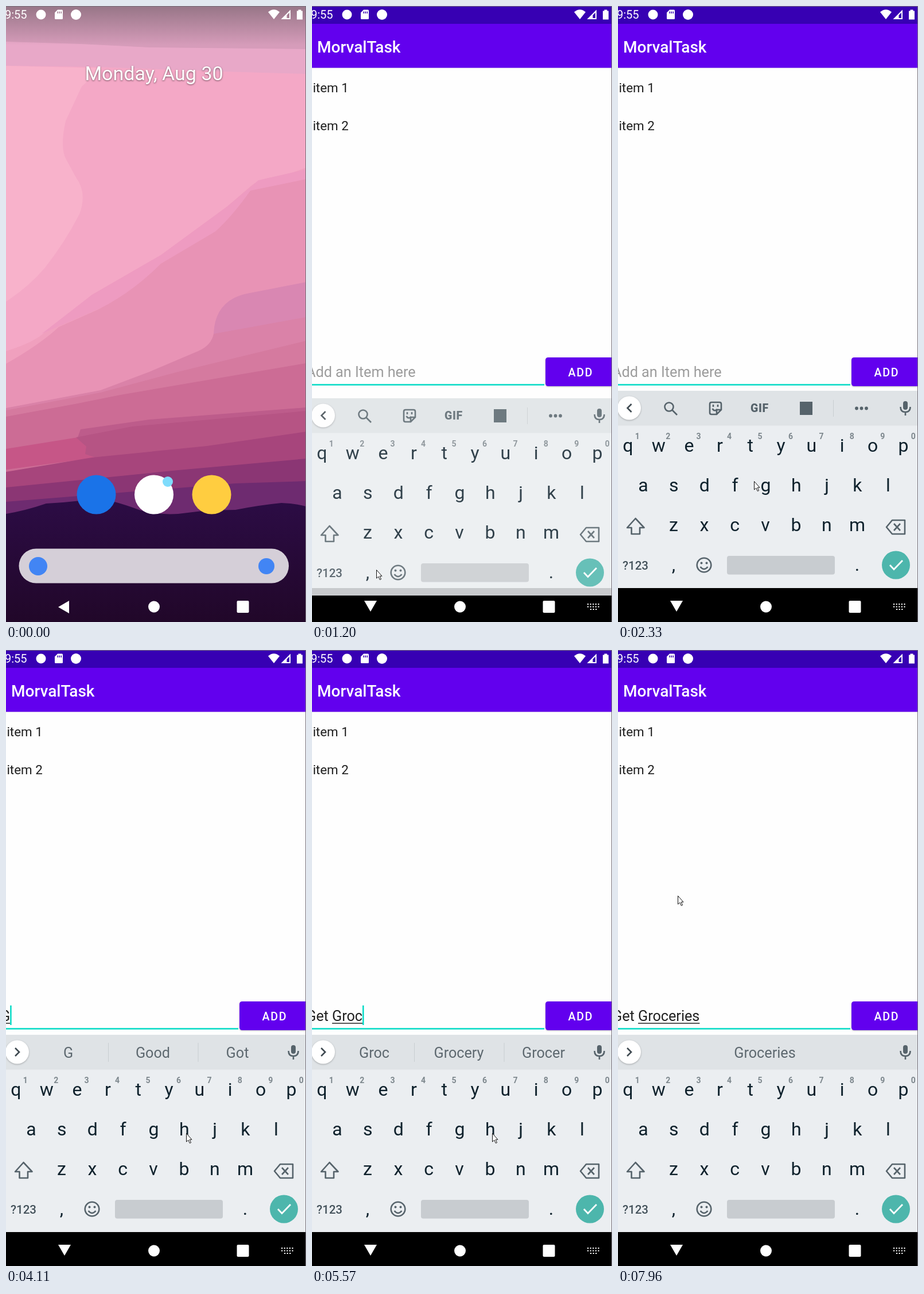
Write an HTML page that moves like this. It is 523 by 1071 pixels and loops after 8000 ms.

```html
<!DOCTYPE html>
<html lang="en">
<head>
<meta charset="utf-8">
<title>To-do app</title>
<style>
  html, body { margin: 0; width: 100%; height: 100%; overflow: hidden; background: #fff; }
  svg { display: block; width: 523px; height: 1071px; font-family: Roboto, sans-serif; }
  text { white-space: pre; }
  .mid { text-anchor: middle; }
  .medium { font-weight: 500; }
  .field { font-size: 25.2px; }
  .item { font-size: 22.4px; fill: #1f1f1f; }
  .key { font-size: 32px; fill: #0e212c; }
  .num { font-size: 14px; font-weight: 700; fill: #7d878d; }
  .icon { fill: none; stroke: #56636b; stroke-width: 2.6; }
  .solid { fill: #56636b; }
  .sug { font-size: 25.2px; fill: #5d686f; }
  .rule { stroke: #c8cdd0; }
  #button { filter: drop-shadow(0 1.5px 1px #0004); }
  #bar { filter: drop-shadow(0 .5px .5px #0003); }
  #knob { filter: drop-shadow(0 1px 1.5px #0004); }
  #date { filter: drop-shadow(0 1px 1.5px #0008); }
</style>
</head>
<body>
<svg viewBox="0 0 523 1071">
  <defs>
    <linearGradient id="scrim" x2="0" y2="1">
      <stop stop-color="#404040" stop-opacity=".42"/>
      <stop offset="1" stop-color="#404040" stop-opacity="0"/>
    </linearGradient>
    <linearGradient id="hill" x2="0" y2="1">
      <stop stop-color="#2c0c45"/>
      <stop offset="1" stop-color="#210729"/>
    </linearGradient>
  </defs>

  <g id="home">
    <rect width="523" height="1071" fill="#f4a8c6"/>
    <path fill="#e8a8c8" d="M0 0H523V118L380 114 160 106 0 104Z"/>
    <path fill="#d69cba" d="M0 0H523V75L250 72 130 66 0 62Z"/>
    <path fill="#f8b2cb" d="M0 104L168 108 132 140 104 200Q94 245 104 265L122 298Q142 325 128 362 102 412 68 455 40 488 0 514Z"/>
    <path fill="#f0a0be" d="M0 600Q50 585 70 565L150 502 270 433 385 349 428 312Q450 296 480 297L523 281V700H0Z"/>
    <path fill="#ee9bc1" d="M62 570L150 502 270 433 385 349 440 303 523 284V400L200 510Z"/>
    <path fill="#e893b5" d="M0 622Q60 588 92 558L160 528Q220 498 270 448L365 392Q395 365 426 321L523 301V720H0Z"/>
    <path fill="#d987b2" d="M523 480L420 500Q364 512 362 570L523 560Z"/>
    <path fill="#da82a8" d="M523 541L362 570Q358 590 335 600L250 636 165 668 0 699V730H523Z"/>
    <path fill="#d57a9f" d="M523 582L300 636 165 672 0 703V730H523Z"/>
    <path fill="#cc6c95" d="M523 621L200 676 120 692 0 714V860H523Z"/>
    <path fill="#bd5c8b" d="M523 698L250 719 130 736 125 750 523 730Z"/>
    <path fill="#c65687" d="M0 770L125 750 160 785 0 806Z"/>
    <path fill="#b65484" d="M523 704L220 731 122 750 140 766 138 779 170 790 523 770Z"/>
    <path fill="#a7457c" d="M523 740L350 765 150 785 0 810V870H523Z"/>
    <path fill="#8b3674" d="M523 787L300 807 0 837V890H523Z"/>
    <path fill="#6e2b70" d="M523 826L400 830 200 846 0 862V900H523Z"/>
    <path fill="url(#hill)" d="M0 883Q35 877 70 865L100 863 130 860 185 861Q205 866 235 877 265 885 300 883L350 877 400 876Q440 868 480 864 505 865 523 870V1071H0Z"/>
    <rect width="523" height="68" fill="url(#scrim)"/>
    <text id="date" class="mid" x="258" y="129" font-size="34" fill="#fff">Monday, Aug 30</text>
    <circle cx="157.500" cy="849.500" r="34" fill="#1a73e8"/>
    <circle cx="258" cy="849.500" r="34" fill="#fff"/>
    <circle cx="282" cy="827" r="9" fill="#7fdcfc"/>
    <circle cx="358.500" cy="849.500" r="34" fill="#ffcd40"/>
    <rect x="22.500" y="943.500" width="470.500" height="60" rx="30" fill="#d5cfd8"/>
    <circle cx="56" cy="974" r="16" fill="#4285f4"/>
    <circle cx="454" cy="974" r="14" fill="#4285f4"/>
  </g>

  <g id="app">
    <rect width="523" height="1071" fill="#fefefe"/>
    <rect id="bar" y="31" width="523" height="76.500" fill="#6200ee"/>
    <rect width="523" height="31" fill="#3700b3"/>
    <text class="medium" x="9" y="81" font-size="28" fill="#fff">MorvalTask</text>
    <text class="item" x="1.400" y="150">item 1</text>
    <text class="item" x="1.400" y="216">item 2</text>
    <g id="row">
      <text id="hint" class="field" x="-10" y="645" fill="#9c9c9c">Add an Item here</text>
      <text id="typed" class="field" x="-10" y="645" fill="#212121"></text>
      <path id="under" stroke="#212121" stroke-width="1.500"/>
      <rect id="caret" y="618" width="2.500" height="34" fill="#03dac5"/>
      <path id="line"/>
      <path id="button" fill="#6200ee" d="M412 611H523V661H412Q407 661 407 656V616Q407 611 412 611Z"/>
      <text class="medium" x="446.500" y="644" font-size="19.600" letter-spacing="1.750" fill="#fff">ADD</text>
    </g>
    <rect y="1012" width="523" height="59"/>
  </g>

  <g id="board">
    <rect y="669" width="523" height="343" fill="#ebeef1"/>
    <rect y="669" width="523" height="60.500" fill="#dfe3e6"/>
    <circle id="knob" cx="19.500" cy="699" r="20.500" fill="#fff"/>
    <path id="chevron" fill="none" stroke="#3f4a51" stroke-width="2.600"/>
    <g id="tools">
      <circle class="icon" cx="89" cy="697" r="7.500"/>
      <path class="icon" d="M94.500 702.500L103 711" stroke-width="3"/>
      <path class="icon" d="M163 689H177Q180 689 180 692V702L172 710H163Q160 710 160 707V692Q160 689 163 689ZM180 702H172V710M164.500 700Q168 706 173 701M166 693V697M174 693V697"/>
      <text x="231" y="706" font-size="19.500" font-weight="900" letter-spacing=".6" class="solid">GIF</text>
      <rect class="solid" x="317" y="688" width="22" height="23"/>
      <path class="rule" d="M375.500 685V714"/>
      <g class="solid"><circle cx="416" cy="699.500" r="2.900"/><circle cx="424.500" cy="699.500" r="2.900"/><circle cx="433" cy="699.500" r="2.900"/></g>
    </g>
    <g id="sugs">
      <path id="rules" class="rule" d="M178.500 683V716M335 683V716"/>
      <text class="sug mid" x="108.500" y="709"></text>
      <text class="sug mid" x="256" y="709"></text>
      <text class="sug mid" x="403.500" y="709"></text>
    </g>
    <rect class="solid" x="497" y="687" width="8" height="15" rx="4"/>
    <path class="icon" d="M492.500 697Q492.500 706 501 706T509.500 697M501 706V712" stroke-width="2.300"/>

    <g id="keys"></g>
    <path class="icon" stroke-linejoin="round" d="M30.500 891L16 907H23.500V918H38V907H45.500Z"/>
    <path class="icon" stroke-linejoin="round" d="M478 894H500V918H478L468 906ZM481 900L492 912M492 900L481 912"/>
    <text class="medium" x="8" y="980" font-size="20.500" fill="#43515a">?123</text>
    <circle class="icon" cx="150" cy="972" r="12.300"/>
    <path class="icon" d="M143.500 975Q150 983 156.500 975"/>
    <circle class="solid" cx="145.500" cy="968.500" r="2"/><circle class="solid" cx="154.500" cy="968.500" r="2"/>
    <rect x="190" y="956" width="188" height="32.500" rx="4" fill="#c8ccd0"/>
    <circle cx="484.500" cy="972" r="24.500" fill="#4db6ac"/>
    <path d="M474 972L481 979.500 496 964" fill="none" stroke="#fff" stroke-width="2.800"/>
  </g>

  <g fill="#fff">
    <text x="-2" y="22" font-size="20">9:55</text>
    <circle cx="61" cy="15" r="8.500"/>
    <path fill-rule="evenodd" d="M90 6.500H97.500Q99 6.500 99 8V21.500Q99 23 97.500 23H86.500Q85 23 85 21.500V11.500ZM89.500 9.500V13H91V9.500ZM92.500 9.500V13H94V9.500ZM95.500 9.500V13H97V9.500Z"/>
    <circle cx="122" cy="15" r="9"/>
    <path d="M457 10.500Q467 2 477 10.500L467 23Z"/>
    <path fill-rule="evenodd" d="M496 6.500V23H479.500ZM494 11.500L489.500 16V21H494Z"/>
    <path d="M509.500 6.500H514.500V8.500H517V23.500H507V8.500H509.500Z"/>
    <path id="back"/>
    <circle cx="258" cy="1044.500" r="10"/>
    <rect x="402.500" y="1034" width="21" height="21" rx="2"/>
    <path id="dots" fill="none" stroke="#fff" stroke-width="2.200" stroke-dasharray="2.200 2.400" d="M480 1040H501.500M480 1044.500H501.500M485 1049H497"/>
  </g>
  <path d="M0 .5H523M522.500 0V1071" stroke="#77717b"/>
  <path id="cursor" fill="#fff" stroke="#111" d="M.5 .5V15L3.800 12 6.300 17.500 8.500 16.500 6.100 11.200H10Z"/>
</svg>

<script>
const LOOP = 8000, LEFT = -10;
const $ = id => document.getElementById(id);
const show = (id, on) => $(id).setAttribute('display', on ? 'inline' : 'none');
const set = (id, name, value) => $(id).setAttribute(name, value);

// Each list holds [start time, ...values]; the last one started applies.
const pick = (list, t) => list.findLast(s => s[0] <= t);

const pointer = [
  [0, 115, 964], [650, 112, 980],
  [1810, 120, 962], [1940, 148, 918], [2070, 182, 874], [2200, 213, 842],
  [2330, 237, 826], [2480, 270, 829], [2620, 292, 835], [2750, 304, 840],
  [2890, 309, 840], [3020, 314, 840],
  [7070, 335, 815], [7250, 450, 705], [7430, 512, 622],
  [7600, 430, 562], [7780, 262, 486], [7960, 104, 427]
];
// Keyboard entrance: vertical offset and opacity.
const entrance = [[0, 343, 0], [1060, 36, .5], [1200, 13, .85], [1350, 0, 1]];
const typing = [
  [0, ''],
  [4110, 'G', 'G', 'Good', 'Got'],
  [4310, 'Ge', 'Ge', 'Get', 'Getting'],
  [4510, 'Get', 'Get', 'Gets', 'Getting'],
  [4720, 'Get ', 'the', 'a', 'it'],
  [4920, 'Get G', 'G', 'Gas', 'Good'],
  [5170, 'Get Gr', 'Gr', 'Great', 'Grab'],
  [5340, 'Get Gro', 'Gro', 'Grow', 'Group'],
  [5500, 'Get Groc', 'Groc', 'Grocery', 'Grocer'],
  [5670, 'Get Groce', 'Groce', 'Grocery', 'Grocer'],
  [5830, 'Get Grocer', 'Grocer', 'Grocery', 'Grocers'],
  [6000, 'Get Groceri', 'Groceri', 'Groceries', 'Grocery'],
  [6280, 'Get Grocerie', 'Grocerie', 'Groceries', ''],
  [6560, 'Get Groceries', '', 'Groceries', '']
];

function addKey(label, x, y, type = 'key') {
  const key = document.createElementNS('http://www.w3.org/2000/svg', 'text');
  key.setAttribute('class', type + ' mid');
  key.setAttribute('x', x);
  key.setAttribute('y', y);
  key.textContent = label;
  $('keys').append(key);
}
[['qwertyuiop', 17.3, 775], ['asdfghjkl', 44, 844], ['zxcvbnm', 97, 913]].forEach(([row, x, y]) =>
  [...row].forEach((c, i) => addKey(c, x + 53.35 * i, y)));
[...'1234567890'].forEach((c, i) => addKey(c, 33.7 + 53.45 * i, 753, 'num'));
addKey(',', 97, 982);
addKey('.', 417, 982);

function drawText(t) {
  const [, text, ...words] = pick(typing, t);
  const typed = $('typed'), any = text !== '';
  typed.textContent = text;
  show('hint', !any);
  show('tools', !any);
  show('sugs', any);
  show('rules', words[0]);
  show('caret', any && t < 7070);
  show('under', any && !text.endsWith(' '));
  set('chevron', 'd', any ? 'M16 692L23 699 16 706' : 'M23.500 692L16.500 699 23.500 706');
  if (!any) return;
  const start = text.lastIndexOf(' ') + 1;
  const from = LEFT + (start ? typed.getSubStringLength(0, start) : 0);
  const end = LEFT + typed.getComputedTextLength();
  set('under', 'd', `M${from} 649H${end}`);
  set('caret', 'x', end);
  document.querySelectorAll('.sug').forEach((s, i) => s.textContent = words[i]);
}

function draw(t) {
  const open = t >= 500, focus = t >= 930, raised = t >= 1060;
  show('home', !open);
  show('app', open);
  show('cursor', open);
  show('board', raised);
  show('dots', raised);
  set('row', 'transform', `translate(0 ${raised ? 0 : 343})`);
  set('line', 'd', focus ? 'M0 658.500H405' : 'M0 657H405');
  set('line', 'stroke', focus ? '#03dac5' : '#777');
  set('line', 'stroke-width', focus ? 2.6 : 1.4);
  set('back', 'd', raised ? 'M91 1034H113L102 1053Z' : 'M91 1045L110 1034V1056Z');
  const [, drop, alpha] = pick(entrance, t);
  set('board', 'transform', `translate(0 ${drop})`);
  set('board', 'opacity', alpha);
  const [, x, y] = pick(pointer, t);
  set('cursor', 'transform', `translate(${x} ${y})`);
  drawText(t);
}

const begin = performance.now();
function tick() {
  draw((performance.now() - begin) % LOOP);
  requestAnimationFrame(tick);
}
tick();
</script>
</body>
</html>
```
